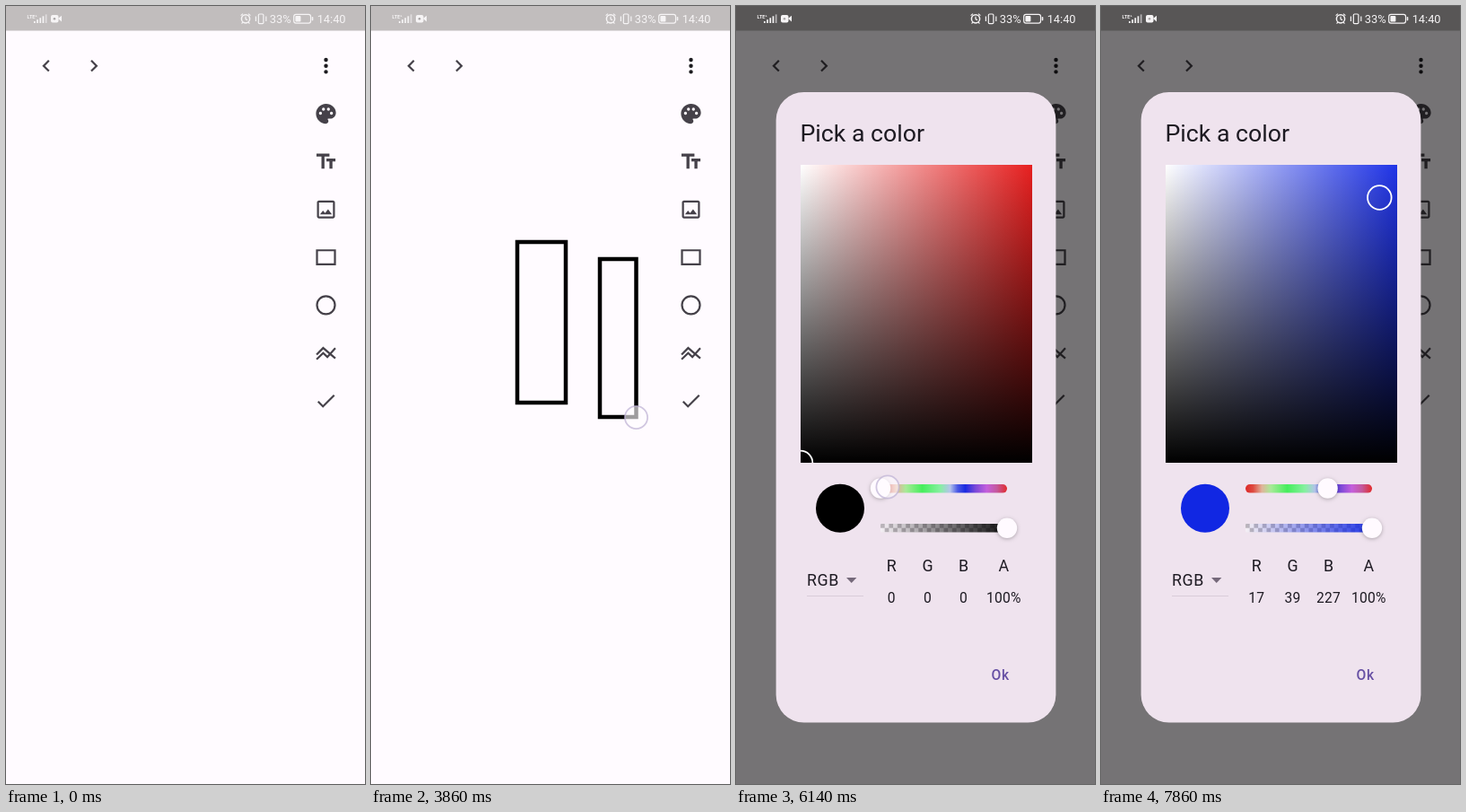
Write an HTML page with a canvas that moves like this. It is 400 px wide and 867 px high and loops after 8 s.

```html
<!DOCTYPE html>
<html lang="en">
<head>
<meta charset="utf-8">
<title>Drawing app</title>
<style>
html, body { margin: 0; width: 100%; height: 100%; overflow: hidden; background: #fffbff; }
canvas { display: block; width: 400px; height: 867px; }
</style>
</head>
<body>
<canvas id="stage"></canvas>
<script>
const W = 400, H = 867, LOOP = 8000, FPS = 7, STEPS = 56;
const DP = 400 / 360;
const canvas = document.getElementById('stage');
const ctx = canvas.getContext('2d');
const ratio = window.devicePixelRatio || 1;
canvas.width = W * ratio;
canvas.height = H * ratio;

const TAU = Math.PI * 2;
const INK = '#454149', TEXT = '#1d1a22';
const SANS = 'Roboto, "Noto Sans", sans-serif';
const SQUARE = { x: 72, y: 177, w: 258, h: 332 };
const TRACK = { x: 161, w: 141 };

const dot = (x, y) => `M${x - 1.5} ${y}a1.5 1.5 0 1 0 3 0a1.5 1.5 0 1 0-3 0z`;
const disc = (y) => `M10 ${y}a2 2 0 1 0 4 0a2 2 0 1 0-4 0z`;
const ICONS = {
  back: 'M15.41 7.41L14 6l-6 6 6 6 1.41-1.41L10.83 12z',
  next: 'M10 6L8.59 7.41 13.17 12l-4.58 4.59L10 18l6-6z',
  more: disc(6) + disc(12) + disc(18),
  palette: 'M12 2C6.49 2 2 6.49 2 12s4.49 10 10 10c1.38 0 2.5-1.12 2.5-2.5 0-.61-.23-1.2-.64-1.67-.08-.1-.13-.21-.13-.33 0-.28.22-.5.5-.5H16c3.31 0 6-2.69 6-6C22 6.04 17.51 2 12 2z' +
    dot(6.5, 11.5) + dot(9.5, 7.5) + dot(14.5, 7.5) + dot(17.5, 11.5),
  text: 'M2.5 4v3h5v12h3V7h5V4h-13zm19 5h-9v3h3v7h3v-7h3V9z',
  image: 'M3 5c0-1.1.9-2 2-2h14c1.1 0 2 .9 2 2v14c0 1.1-.9 2-2 2H5c-1.1 0-2-.9-2-2zM5 5v14h14V5zM14.14 11.86l-3 3.87L9 13.14 6 17h12z',
  rect: 'M2 4v16h20V4zM4 6h16v12H4z',
  circle: 'M2 12a10 10 0 1 0 20 0a10 10 0 1 0-20 0zM4 12a8 8 0 1 0 16 0a8 8 0 1 0-16 0z',
  check: 'M9 16.17L4.83 12l-1.42 1.41L9 19 21 7l-1.41-1.41z'
};
for (const name in ICONS) ICONS[name] = new Path2D(ICONS[name]);
const ZIGZAG = new Path2D('M2.6 13.6L9.2 7L21.4 17.4M2.6 18.4L9.2 12L13.4 16L21.4 7.2');

// Finger strokes: [step, x, y]; each ends after its last step
const STROKES = {
  first: [[2, 152, 244], [3, 152, 244], [5, 163, 263], [10.5, 217, 442], [11, 217, 442]],
  second: [[15, 248, 265], [17, 255, 282], [27, 295.5, 458.5], [28, 295.5, 459]],
  tap: [[35, 363, 124], [35.5, 363, 124]],
  hue: [[42, 167, 537], [43, 169, 536], [47.5, 252.6, 553], [49, 252.6, 554]],
  shade: [[51, 262, 262], [53.5, 310.3, 213.5], [54, 310.3, 213.5]]
};

const clamp = (v, a, b) => Math.min(b, Math.max(a, v));
const smooth = (p) => p * p * (3 - 2 * p);

function along(keys, s) {
  s = clamp(s, keys[0][0], keys[keys.length - 1][0]);
  let i = 1;
  while (s > keys[i][0]) i++;
  const [s0, x0, y0] = keys[i - 1], [s1, x1, y1] = keys[i];
  const p = smooth((s - s0) / (s1 - s0));
  return { x: x0 + (x1 - x0) * p, y: y0 + (y1 - y0) * p };
}

function hsv(h, s, v) {
  const f = (n) => {
    const k = (n + h / 60) % 6;
    return Math.round(255 * v * (1 - s * clamp(Math.min(k, 4 - k), 0, 1)));
  };
  return [f(5), f(3), f(1)];
}
const rgb = (c, a = 1) => `rgba(${c.join()},${a})`;

function circle(x, y, r, fill, stroke, width) {
  ctx.beginPath();
  ctx.arc(x, y, r, 0, TAU);
  if (fill) { ctx.fillStyle = fill; ctx.fill(); }
  if (stroke) { ctx.strokeStyle = stroke; ctx.lineWidth = width; ctx.stroke(); }
}

function round(x, y, w, h, r, fill) {
  ctx.beginPath();
  ctx.roundRect(x, y, w, h, r);
  if (fill) { ctx.fillStyle = fill; ctx.fill(); }
}

function label(str, x, y, size, { color = TEXT, align = 'center', weight = 400, gap = 0 } = {}) {
  ctx.font = `${weight} ${size}px ${SANS}`;
  ctx.letterSpacing = gap + 'px';
  ctx.textAlign = align;
  ctx.fillStyle = color;
  ctx.fillText(str, x, y);
}

function gradient(x0, y0, x1, y1, ...stops) {
  const g = ctx.createLinearGradient(x0, y0, x1, y1);
  stops.forEach(([at, color]) => g.addColorStop(at, color));
  return g;
}

function icon(name, x, y, color = INK) {
  ctx.save();
  ctx.translate(x, y);
  ctx.scale(DP, DP);
  ctx.translate(-12, -12);
  if (name === 'zigzag') {
    ctx.strokeStyle = color;
    ctx.lineWidth = 2;
    ctx.stroke(ZIGZAG);
  } else {
    ctx.fillStyle = color;
    ctx.fill(ICONS[name], 'evenodd');
  }
  ctx.restore();
}

function toolbar(step) {
  icon('back', 44.8, 66.7);
  icon('next', 98, 66.7);
  const ripple = [0.05, 0.1, 0.13, 0.13, 0.06][step - 35];
  if (ripple) circle(356.5, 120, 22.2, `rgba(40,36,44,${ripple})`);
  ['more', 'palette', 'text', 'image', 'rect', 'circle', 'zigzag', 'check'].forEach((name, i) =>
    icon(name, 356.5, 66.7 + i * 53.33, i ? INK : '#1c1b1f'));
}

function box(keys, slop, step) {
  const [s, x, y] = keys[slop];
  if (step <= s) return;
  const end = along(keys, step);
  ctx.strokeStyle = '#000';
  ctx.lineWidth = 4.5;
  ctx.strokeRect(x, y, end.x - x, Math.min(end.y, 458) - y);
}

function statusBar() {
  const c = '#f6f4f5';
  label('LTE⁺', 23.5, 13.5, 5.5, { color: c, align: 'left', weight: 700 });
  for (let i = 0; i < 5; i++) {
    ctx.globalAlpha = i < 4 ? 1 : 0.6;
    ctx.fillStyle = c;
    const h = 2 + i * 1.9;
    ctx.fillRect(31 + i * 3.2, 19 - h, 1.7, h);
  }
  ctx.globalAlpha = 1;
  round(50, 10, 8.5, 8.5, 2, c);
  ctx.beginPath();
  ctx.moveTo(58, 14);
  ctx.lineTo(62, 10.8);
  ctx.lineTo(62, 17.6);
  ctx.fill();
  circle(54, 14.2, 1.3, '#aaa6a7');

  // Alarm, vibrate, battery
  circle(267, 14.3, 4.6, null, c, 1.5);
  ctx.beginPath();
  ctx.moveTo(267, 11.8); ctx.lineTo(267, 14.6); ctx.lineTo(269, 15.6);
  ctx.moveTo(261.6, 10.6); ctx.lineTo(264, 8.6);
  ctx.moveTo(272.4, 10.6); ctx.lineTo(270, 8.6);
  ctx.moveTo(263.8, 18); ctx.lineTo(262.6, 19.6);
  ctx.moveTo(270.2, 18); ctx.lineTo(271.4, 19.6);
  ctx.lineWidth = 1.2;
  ctx.stroke();
  round(281.3, 9, 5.6, 10.6, 1.2);
  ctx.stroke();
  ctx.beginPath();
  ctx.moveTo(278.4, 11.5); ctx.lineTo(278.4, 17);
  ctx.moveTo(289.8, 11.5); ctx.lineTo(289.8, 17);
  ctx.stroke();
  label('33%', 305.7, 19, 12.9, { color: c });
  round(320.7, 9.3, 18.8, 9.8, 2.4);
  ctx.stroke();
  round(322.4, 11, 6, 6.4, 1, c);
  round(340.7, 12, 1.6, 4.4, 0.8, c);
  label('14:40', 362.6, 19, 12.8, { color: c });
}

function thumb(x, y) {
  ctx.save();
  ctx.shadowColor = 'rgba(0,0,0,.28)';
  ctx.shadowBlur = 4 * ratio;
  ctx.shadowOffsetY = ratio;
  circle(x, y, 11.2, '#fffaff');
  ctx.restore();
}

function square(hue, cursor) {
  const { x, y, w, h } = SQUARE;
  const shown = hsv(hue, 1, 1).map((v) => Math.round(32 + v * 0.78));
  ctx.save();
  ctx.beginPath();
  ctx.rect(x, y, w, h);
  ctx.clip();
  const fills = [
    rgb(shown),
    gradient(x, 0, x + w, 0, [0, '#fff'], [1, 'rgba(255,255,255,0)']),
    gradient(0, y, 0, y + h, [0, 'rgba(0,0,0,0)'], [1, '#000'])
  ];
  for (const f of fills) {
    ctx.fillStyle = f;
    ctx.fillRect(x, y, w, h);
  }
  circle(cursor.x, cursor.y, 13.3, null, '#fff', 1.8);
  ctx.restore();
}

function sliders(hueX, color) {
  const { x, w } = TRACK;
  round(x, 533, w, 9.6, 4.8, gradient(x, 0, x + w, 0,
    [0, '#dd2828'], [0.06, '#de4a40'], [0.13, '#e0b49a'], [0.2, '#a8ea98'], [0.33, '#46ee5c'],
    [0.47, '#86f0a0'], [0.55, '#b4c4ec'], [0.61, '#4a58e4'], [0.67, '#1a2ae0'],
    [0.75, '#7a48d8'], [0.84, '#c45fdc'], [0.92, '#c4589c'], [1, '#e22c2c']));
  thumb(hueX, 537.5);

  ctx.save();
  round(x, 577, w, 9.4, 1, '#f4eff4');
  ctx.clip();
  ctx.fillStyle = '#bcb6bc';
  for (let i = 0; i < 30; i++) ctx.fillRect(x + i * 4.7, 577 + (i % 2) * 4.7, 4.7, 4.7);
  ctx.fillStyle = gradient(x, 0, x + w, 0, [0, rgb(color, 0)], [1, rgb(color, 0.93)]);
  ctx.fillRect(x, 577, w, 10);
  ctx.restore();
  thumb(x + w, 581.8);
}

function dialog(step) {
  const hueX = step < 44 ? TRACK.x : along(STROKES.hue, step).x;
  const hue = (hueX - TRACK.x) / TRACK.w * 360;
  const { x, y, w, h } = SQUARE;
  const cursor = step < 51 ? { x, y: y + h } : along(STROKES.shade, step);
  const color = hsv(hue, (cursor.x - x) / w, 1 - (cursor.y - y) / h);

  round(44.6, 96, 311.8, 702.5, 31, '#efe3ee');
  label('Pick a color', 71.5, 150.5, 26.7, { align: 'left' });
  square(hue, cursor);
  circle(116, 559.7, 27, rgb(color));
  sliders(hueX, color);

  label('RGB', 79, 646, 17.8, { align: 'left', gap: 0.55 });
  ctx.beginPath();
  ctx.moveTo(123, 637);
  ctx.lineTo(134.4, 637);
  ctx.lineTo(128.7, 643);
  ctx.fillStyle = '#75697a';
  ctx.fill();
  ctx.fillStyle = '#d9ccd9';
  ctx.fillRect(79, 657, 63, 1);

  [...color, '100%'].forEach((value, i) => {
    const cx = [173.3, 213.5, 253.5, 298.3][i];
    label('RGBA'[i], cx, 630, 17.8);
    label(String(value), cx, 664.8, 15.6, { gap: 0.28 });
  });
  label('Ok', 294.6, 751.3, 15.6, { color: '#6750a4', weight: 500, gap: 0.7 });
}

function finger(step) {
  for (const keys of Object.values(STROKES)) {
    if (step < keys[0][0] || step > keys[keys.length - 1][0]) continue;
    const { x, y } = along(keys, step);
    circle(x, y, 12.6, 'rgba(255,252,255,.62)', 'rgba(190,178,212,.72)', 1.8);
  }
}

function draw(step) {
  ctx.setTransform(ratio, 0, 0, ratio, 0, 0);
  ctx.fillStyle = '#fffbff';
  ctx.fillRect(0, 0, W, H);
  ctx.fillStyle = '#c1bdbd';
  ctx.fillRect(0, 0, W, 27.5);
  box(STROKES.first, 2, step);
  box(STROKES.second, 1, step);
  toolbar(step);

  const open = clamp((step - 36) / 1.2, 0, 1);
  if (open) {
    ctx.fillStyle = `rgba(0,0,0,${0.54 * open})`;
    ctx.fillRect(0, 0, W, H);
    ctx.globalAlpha = open;
    dialog(step);
    ctx.globalAlpha = 1;
  }
  statusBar();
  finger(step);
}

function tick() {
  const t = performance.now() % LOOP;
  draw(Math.floor((t + 5) * FPS / 1000) % STEPS);
  requestAnimationFrame(tick);
}
tick();
</script>
</body>
</html>
```
